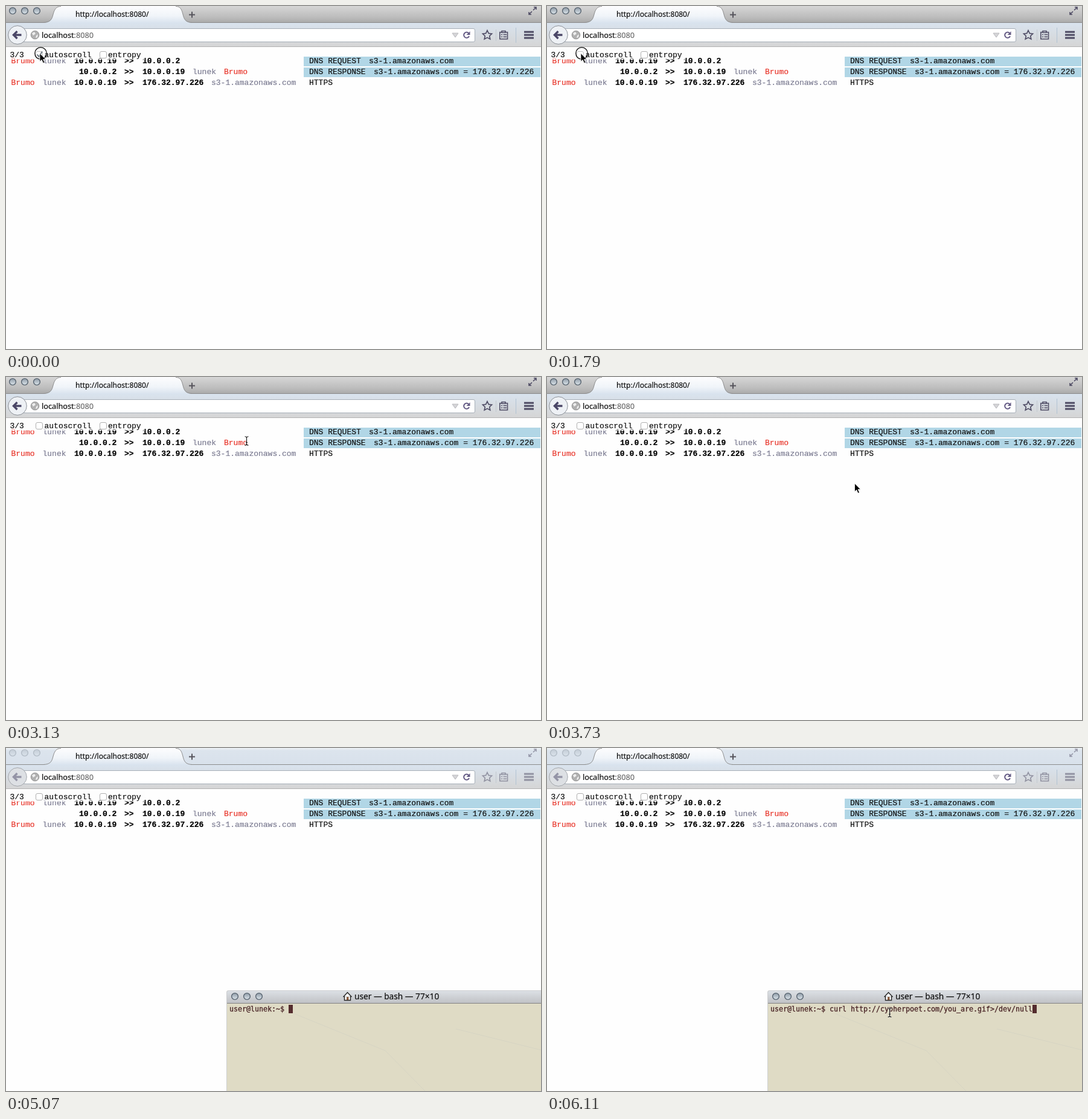
An HTML page for the animation above (8 s loop, 886 by 569 pixels).

```html
<!DOCTYPE html>
<html lang="en">
<head>
<meta charset="utf-8">
<title>Traffic monitor</title>
<style>
  html, body { margin: 0; width: 100%; height: 100%; overflow: hidden; background: #fefefe; }
  svg { display: block; }
  text { white-space: pre; fill: currentColor; stroke: currentColor; stroke-width: .2; }
  .ui { font-family: "Noto Sans", sans-serif; color: #111; }
  .page { font: 13px "Liberation Mono", monospace; color: #111; }
  .vendor { color: #e8352a; }
  .host { color: #7c7c92; }
  .ip { font-weight: bold; color: #000; }
  .term { font: 11.63px "DejaVu Sans Mono", monospace; color: #482325; stroke-width: .3; }
  .port { color: #6c6c6c; }
  .line { fill: none; stroke: #4d4a63; stroke-width: 1.6; }
  .frame { fill: url(#frameFill); }
  .edge { fill: none; stroke: #8b8b8b; }
  .back { fill: #eef1f5; stroke: #8b9097; }
  .inactive .icon { opacity: .5; }
  .inactive .lights { opacity: .3; }
  .inactive .frame { fill: url(#paleFill); }
  .inactive .back { fill: #dde0e4; stroke: #a3a7ac; }
</style>
</head>
<body>
<svg width="886" height="569" viewBox="0 0 886 569">
  <defs>
    <linearGradient id="frameFill" x2="0" y2="1">
      <stop stop-color="#d6d6d6"/><stop offset=".65" stop-color="#bdbdbd"/><stop offset="1" stop-color="#a9a9a9"/>
    </linearGradient>
    <linearGradient id="paleFill" x2="0" y2="1">
      <stop stop-color="#eef2f6"/><stop offset=".15" stop-color="#dce4ed"/><stop offset="1" stop-color="#d8e1eb"/>
    </linearGradient>
    <linearGradient id="tabFill" x2="0" y2="1">
      <stop stop-color="#fdfdfe"/><stop offset=".6" stop-color="#f0f4f9"/><stop offset="1" stop-color="#d9e3ee"/>
    </linearGradient>
    <linearGradient id="barFill" x2="0" y2="1">
      <stop stop-color="#d9e3ee"/><stop offset="1" stop-color="#d5d5d5"/>
    </linearGradient>
    <linearGradient id="titleFill" x2="0" y2="1">
      <stop stop-color="#dde1e6"/><stop offset="1" stop-color="#bfc0c4"/>
    </linearGradient>
    <linearGradient id="lightFill" x2="0" y2="1">
      <stop stop-color="#8e9aa6"/><stop offset="1" stop-color="#dde6ec"/>
    </linearGradient>
    <g id="lights" fill="url(#lightFill)" stroke="#56626e" stroke-width="1.4">
      <circle r="5.4"/><circle cx="20" r="5.4"/><circle cx="40" r="5.4"/>
    </g>
    <rect id="box" x=".5" y=".5" width="11" height="11" rx="2.5" fill="#fff" stroke="#b0b0b0"/>
    <path id="beamShape" d="M.5 .7Q3 .7 3.5 2.5Q4 .7 6.5 .7M3.5 2V14M.5 15.3Q3 15.3 3.5 13.5Q4 15.3 6.5 15.3M2 10.5H5"/>
  </defs>

  <g id="browser">
    <rect class="frame" width="886" height="28"/>
    <rect y="28" width="886" height="40" fill="url(#barFill)"/>
    <path class="edge" d="M0 27.5H64M306 27.5H886"/>
    <path d="M62 28C74 27 76 22 78 14S83 0 91 0H281C289 0 291 6 293 14S297 27 308 28Z" fill="url(#tabFill)"/>
    <path class="edge" d="M62 27.5C74 27 76 22 78 14S83 .5 91 .5M281 .5C289 .5 291 6 293 14S297 27 308 27.5"/>
    <path d="M0 67.5H886" stroke="#b2b2b2"/>
    <use class="lights" href="#lights" x="11" y="8"/>
    <text class="ui" x="115" y="18" font-size="12">http://localhost:8080/</text>
    <path d="M303 14.5H313M308 9.5V19.5" stroke="#56545c" stroke-width="2"/>
    <path class="icon line" d="M873 7L878 2M874 2H878V6M871 9L866 14M870 14H866V10"/>
    <rect x="24.5" y="37.5" width="752" height="22" rx="2.5" fill="#fff" stroke="#a7afb8"/>
    <circle class="back" cx="19" cy="48" r="15.3"/>
    <path class="icon" d="M18.5 42L12.5 48L18.5 54M13 48H25.5" fill="none" stroke="#4b4767" stroke-width="3.4"/>
    <circle cx="48" cy="48" r="6.8" fill="#b1b1b1" stroke="#929292"/>
    <path d="M43 45L47 43L49 46L45 49ZM50 49L53 47L52 52L49 53Z" fill="#eee"/>
    <text class="ui" x="59" y="53" font-size="12.7">localhost<tspan class="port">:8080</tspan></text>
    <path d="M739 45H749L744 52Z" fill="#d5d5d8" stroke="#b9b9bd"/>
    <path d="M766.5 45.5A4.6 4.6 0 1 0 767 50" fill="none" stroke="#665d86" stroke-width="2"/>
    <path d="M768.5 42V48H762.5Z" fill="#665d86"/>
    <path d="M811.5 39V58" stroke="#c3c9d0"/>
    <path d="M844.5 36V61" stroke="#b2c3d3"/>
    <g class="icon line">
      <path d="M797 40.5L799.3 45.4L804.6 46L800.7 49.7L801.8 55L797 52.3L792.2 55L793.3 49.7L789.4 46L794.7 45.4Z"/>
      <path d="M821 43.5H817.8V54.7H830.5V43.5H827M821 44V41.5H827V44ZM820 47.5H822M823.5 47.5H829M820 51.2H822M823.5 51.2H829"/>
      <path d="M858 43H874M858 48H874M858 53H874" stroke-width="2.8"/>
    </g>
  </g>

  <g class="page">
    <path d="M493 84H885V100H493ZM493 102H885V118H493Z" fill="#b1d6e6"/>
    <g id="rows"></g>
    <rect y="68" width="230" height="21" fill="#fefefe" opacity=".65"/>
    <text x="6.5" y="85">3/3</text>
    <use href="#box" x="49" y="75"/>
    <path id="check" d="M51.5 80.5L54.5 84L60 75.5" fill="none" stroke="#4c5c66" stroke-width="2"/>
    <text x="63.5" y="85">autoscroll</text>
    <use href="#box" x="155" y="75"/>
    <text x="169" y="85">entropy</text>
  </g>

  <g id="terminal">
    <path d="M365 569V406Q365 402 369 402H886V569Z" fill="#dfdbc5"/>
    <path d="M365 424V406Q365 402 369 402H886V424Z" fill="url(#titleFill)"/>
    <path d="M365 423.5H886" stroke="#828282"/>
    <path d="M365.5 569V406Q365.5 402.5 369 402.5H886" fill="none" stroke="#cdced0"/>
    <path d="M478 441L628 502L694 569M745 466L886 501" fill="none" stroke="#d6d4c3"/>
    <use href="#lights" x="379" y="412"/>
    <path d="M558.5 413L565.5 405.5L572.5 413M560.5 412V418.5H570.5V412" fill="#fff" stroke="#222" stroke-width="1.4"/>
    <path d="M564 418V413H567.5V418Z" fill="#8a5a3c"/>
    <text class="ui" x="577" y="417" font-size="13.7">user — bash — 77×10</text>
    <text class="term" x="370" y="437">user@lunek:~$ <tspan id="command"></tspan></text>
    <rect id="caret" y="426" width="7" height="14" fill="#542c2e"/>
  </g>

  <circle id="click" r="9.8" fill="#fff" fill-opacity=".2" stroke="#111" stroke-width="1.3"/>
  <path id="arrow" d="M1.5 .5V14.2L4.7 11.3L7 16.7L9.4 15.7L7.1 10.4H11.3Z" stroke="#fff" stroke-width=".8"/>
  <g id="beam" fill="none">
    <use href="#beamShape" stroke="#fff" stroke-width="2.2" opacity=".6"/>
    <use href="#beamShape" stroke="#111" stroke-width="1.1"/>
  </g>
</svg>

<script>
const LOOP = 8000;
const COMMAND = "curl http://cypherpoet.com/you_are.gif>/dev/null";
const el = id => document.getElementById(id);

// Each cell: [class, x, text]
const vendor = x => ["vendor", x, "Brumo"];
const host = (x, name = "lunek") => ["host", x, name];
const ip = (x, address) => ["ip", x, address];
const note = (x, text) => ["", x, text];
const site = "s3-1.amazonaws.com";
const rows = [
  [vendor(8.5), host(60.5), ip(113, "10.0.0.19"), ip(196, ">>"), ip(226, "10.0.0.2"),
    note(502, "DNS REQUEST"), note(601, site)],
  [ip(121, "10.0.0.2"), ip(196, ">>"), ip(226, "10.0.0.19"), host(309), vendor(361),
    note(502, "DNS RESPONSE"), note(609, site + " = 176.32.97.226")],
  [vendor(8.5), host(60.5), ip(113, "10.0.0.19"), ip(196, ">>"), ip(226, "176.32.97.226"),
    host(340, site), note(502, "HTTPS")]
];
rows.forEach((cells, i) => cells.forEach(([kind, x, content]) => {
  const text = document.createElementNS("http://www.w3.org/2000/svg", "text");
  text.setAttribute("class", kind);
  text.setAttribute("x", x);
  text.setAttribute("y", 95 + 18 * i);
  text.textContent = content;
  el("rows").append(text);
}));

// The pointer jumps: [start time, shape, x, y]
const pointer = [
  [0, "arrow", 54.5, 78], [2240, "beam", 360, 102], [2390, "beam", 420, 122],
  [2540, "arrow", 494, 117], [2690, "arrow", 496, 104], [2990, "arrow", 437, 109],
  [3130, "beam", 395, 98], [3430, "arrow", 418, 112], [3580, "arrow", 500, 168],
  [3730, "arrow", 508, 176], [4030, "arrow", 677, 356], [4170, "arrow", 776, 412],
  [4320, "arrow", 867, 464], [4470, "none", 0, 0], [5370, "beam", 617, 431],
  [5520, "beam", 564, 431]
];
// Click rings: [start, end, x, y]
const clicks = [[0, 140, 57.5, 78.5], [1790, 1940, 57.5, 78.5], [5820, 5960, 568.5, 437.5]];

const show = (id, on) => el(id).style.display = on ? "" : "none";
const place = (id, x, y) => el(id).setAttribute("transform", `translate(${x} ${y})`);

function draw(t) {
  const [, shape, x, y] = pointer.findLast(step => t >= step[0]);
  for (const id of ["arrow", "beam"]) {
    show(id, id === shape);
    place(id, x, y);
  }
  const click = clicks.find(([start, end]) => t >= start && t < end);
  show("click", click);
  if (click) place("click", click[2], click[3]);

  show("check", t < 1790);
  show("terminal", t >= 5070);
  el("browser").classList.toggle("inactive", t >= 5070);

  const typed = t >= 6110 ? COMMAND : "";
  el("command").textContent = typed;
  el("caret").setAttribute("x", 468 + 7 * typed.length);
}

function tick() {
  draw(performance.now() % LOOP);
  requestAnimationFrame(tick);
}
tick();
</script>
</body>
</html>
```
